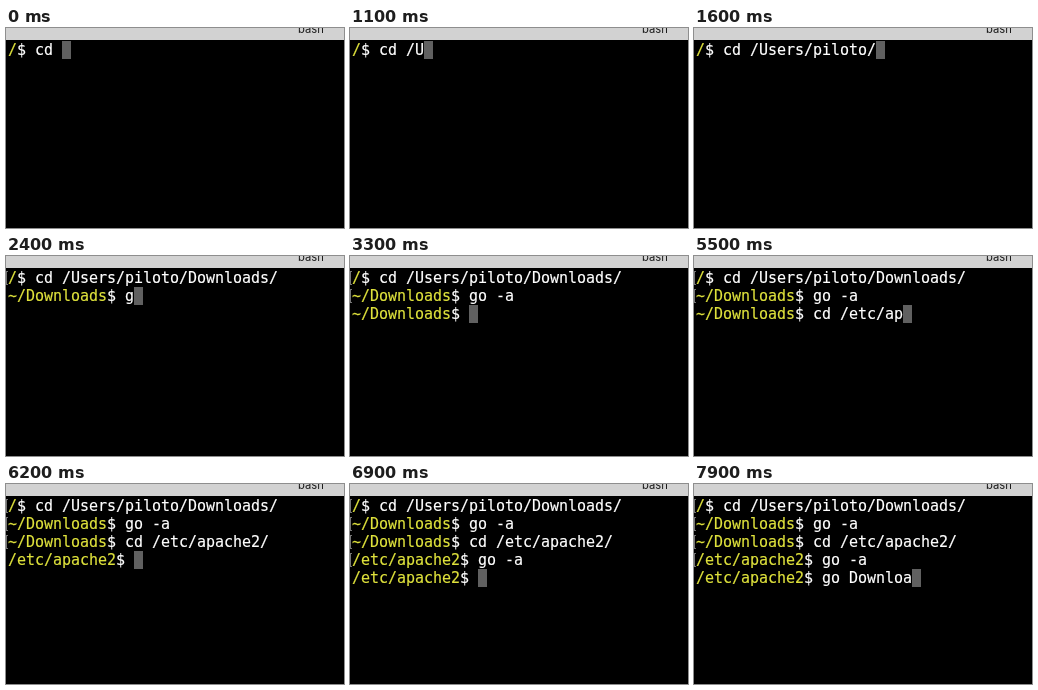
Animation of 338 by 200 pixels, one loop 8000 ms. Source, as an HTML page:

```html
<!DOCTYPE html>
<html lang="en">
<meta charset="utf-8">
<title>Terminal</title>
<style>
  html, body { margin: 0; width: 100%; height: 100%; overflow: hidden; background: #000; }
  #stage { position: relative; width: 338px; height: 200px; overflow: hidden; background: #000; }
  #bar { position: absolute; inset: 0 0 auto; height: 12px; overflow: hidden; background: #d2d2d2; }
  #bar span { position: absolute; left: 292px; top: -8px; color: #1c1c1c;
              font: 11.2px/18px Inter, sans-serif; }
  #screen { position: absolute; left: 0; top: 13px; color: #fff; white-space: pre;
            font: 15px/18px "DejaVu Sans Mono", monospace; letter-spacing: -0.03px;
            -webkit-text-stroke: 0.2px; }
  .line { position: relative; height: 18px; padding-left: 2px; }
  .done::before { content: ""; position: absolute; left: 0; top: 2px; width: 1px; height: 12px;
                  border: solid #777; border-width: 1px 0 1px 1px; }
  .path { color: #dfe23c; }
  .cursor { display: inline-block; width: 9px; height: 18px; background: #606060; vertical-align: top; }
</style>
<div id="stage">
  <div id="bar"><span>bash</span></div>
  <div id="screen"></div>
</div>
<script>
const LOOP = 8000;
const home = "~/Downloads$ ", etc = "/etc/apache2$ ";

// [time in ms, text appended]; long pieces are tab completions
const keys = [
  [0, "/$ cd "], [200, "/"],
  [1100, "U"], [1200, "s"], [1300, "ers/"],
  [1500, "p"], [1600, "iloto/"],
  [1700, "D"], [1800, "o"], [1900, "w"], [2000, "nloads/"], [2100, "\n"], [2200, home],
  [2400, "g"], [2500, "o"], [2600, " "], [2700, "-"], [2900, "a"], [3100, "\n" + home],
  [3500, "c"], [3700, "d"], [3900, " "], [4400, "/"],
  [4600, "e"], [4700, "t"], [4800, "c"], [5000, "/"], [5300, "a"],
  [5500, "p"], [5600, "a"], [5800, "che2/"], [6000, "\n"], [6100, etc],
  [6400, "g"], [6500, "o"], [6600, " "], [6700, "-"], [6800, "a"], [6900, "\n" + etc],
  [7300, "g"], [7400, "o"], [7500, " D"], [7600, "o"], [7700, "wn"], [7800, "l"], [7900, "oa"]
];

const screenBox = document.getElementById("screen");
let shown = "";

function render(text) {
  const lines = text.split("\n"), last = lines.length - 1;
  screenBox.innerHTML = lines.map((line, i) => {
    const styled = line.replace(/^[^$]+(?=\$)/, '<span class="path">$&</span>');
    return i < last
      ? `<div class="line done">${styled}</div>`
      : `<div class="line">${styled}<span class="cursor"></span></div>`;
  }).join("");
}

function frame() {
  const t = performance.now() % LOOP;
  const text = keys.filter(([at]) => at <= t).map(([, s]) => s).join("");
  if (text !== shown) render(shown = text);
  requestAnimationFrame(frame);
}
frame();
</script>
</html>
```
